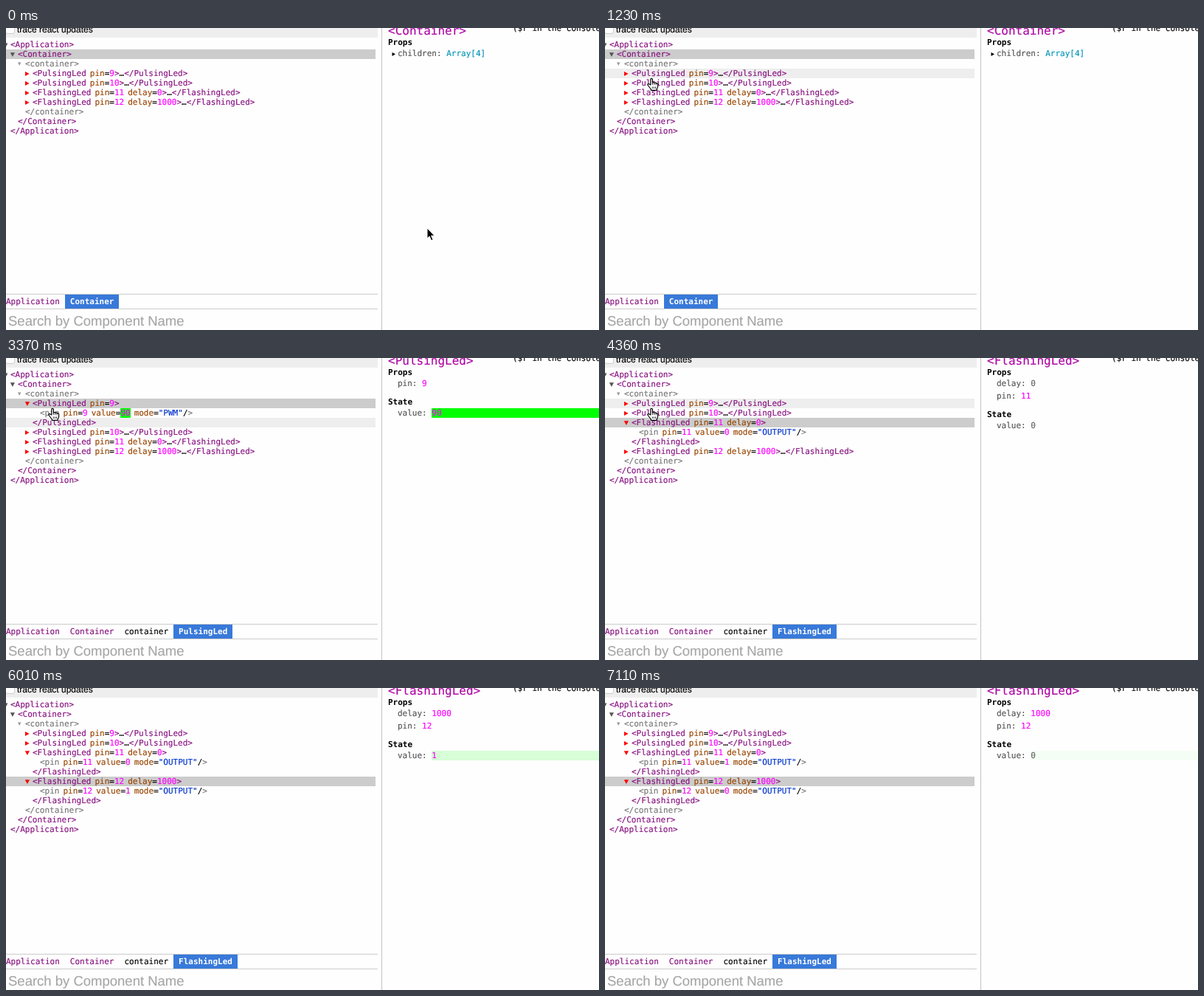
Animation, 804 px wide and 409 px high, one loop 7210 ms. Source, as an HTML page:

```html
<!DOCTYPE html>
<html lang="en">
<head>
<meta charset="utf-8">
<title>Component inspector</title>
<style>
html, body { margin: 0; width: 100%; height: 100%; overflow: hidden; background: #fff; }
#stage { position: relative; width: 804px; height: 409px; overflow: hidden; background: #fefefe;
  font: 11px/13px "DejaVu Sans Mono", Menlo, monospace; color: #000;
  text-rendering: geometricPrecision; -webkit-text-stroke: .15px; white-space: pre; }
#stage > div, #tree > div, #panel > div, svg { position: absolute; }
#tree, #panel { left: 0; top: 0; width: 804px; height: 409px; }
.sans { font-family: "Liberation Sans", Arial, sans-serif; }
#bar { left: 0; top: 0; width: 504px; height: 13px; background: #eee; }
#box { left: -1px; top: -6px; width: 11px; height: 12px; background: #fff; border: 1px solid #ccc; border-radius: 3px; }
#trace { left: 15px; top: -5px; font-size: 12px; line-height: 14px; }
#split { left: 509px; top: 0; width: 1px; height: 409px; background: #c4c4c4; }
#crumbs { left: 0; top: 360px; width: 504px; height: 19px; border: solid #ccc; border-width: 1px 0; line-height: 19px; overflow: hidden; }
#crumbs div { display: flex; margin-left: -7px; }
#crumbs span { padding: 0 7px; }
#crumbs span.on { background: #3879d9; color: #fff; font-weight: bold; -webkit-text-stroke: 0; }
#search { left: 3px; top: 386px; font-size: 18.5px; line-height: 22px; color: #a6a6a6; }
#tree > div { left: 0; width: 501px; height: 13px; box-sizing: border-box; }
.hover { background: #eee; }
.sel { background: #ccc; }
.c { color: #881280; }
.d { color: #777; }
.a { color: #994500; margin-left: 5px; }
.n { color: #f0f; }
.s { color: #0033cc; }
.k { color: #000; }
#hint { left: 687px; top: -6px; }
#title { left: 518px; top: -6px; font-size: 16px; line-height: 19px; color: #ae08a4; }
#panel .key { left: 531px; color: #555; }
#panel .val { right: 0; height: 13px; color: #666; }
#panel .val.n { color: #f0f; }
#panel .val.s { color: #0033cc; }
#panel .val.arr { color: #0095b8; }
#panel .head { left: 518px; font-weight: bold; -webkit-text-stroke: 0; }
</style>
</head>
<body>
<div id="stage">
  <div id="bar"></div>
  <div id="box"></div>
  <div id="trace" class="sans">trace react updates</div>
  <div id="tree"></div>
  <div id="crumbs"></div>
  <div id="search" class="sans">Search by Component Name</div>
  <div id="split"></div>
  <div id="hint">($r in the console)</div>
  <div id="title"></div>
  <div id="panel"></div>
  <svg id="arrow" width="14" height="20" viewBox="-1 -1 14 20">
    <path d="M0 0V14L3.2 11.2L5.6 16.8L8 15.8L5.6 10.4H10Z" fill="#000" stroke="#fff" stroke-width="1"/>
  </svg>
  <svg id="hand" width="17" height="19" viewBox="-7 -1 17 19">
    <path d="M-1.2 9V1.6Q-1.2 .4 0 .4T1.4 1.6V6Q2.6 5 3.8 6.3Q5.2 5.4 6.3 6.8Q8.6 6.3 8.6 8.4V11.5Q8.4 13 7.3 14.2V16.4H-.6V15L-3.8 11L-5.2 8.8Q-5 7.2-3.4 7.7Z" fill="#fff" stroke="#000" stroke-width="1.2" stroke-linejoin="round"/>
    <path d="M1.4 6V9M3.9 6.5V9.2M6.3 7V9.4M1.3 11.5V14M3.4 11.5V14M5.5 11.5V14" fill="none" stroke="#000" stroke-width=".8"/>
  </svg>
</div>
<script>
const LOOP = 7210, CHAR = 6.62, ROW = 13, TOP = 16;
const $ = id => document.getElementById(id);

// [start, node, closing tag selected]
const PICKS = [[0, 'Container'], [1530, 'p9'], [3950, 'p10'], [4180, 'f11'],
  [4480, 'pin11'], [4720, 'f11', true], [4880, 'f12']];
const OPEN = { p9: [2610, 3830], f11: [4360, LOOP], f12: [5180, LOOP] };
const FLIPS = [4600, 5480, 6240];
// [start, end, steps, from x, y, to x, y]
const MOVES = [[300, 520, 5, 571, 271, 67, 32], [1000, 1230, 5, 67, 32, 63, 67],
  [5480, 5900, 7, 63, 67, -16, 370]];

const LEDS = [
  { id: 'p9', name: 'PulsingLed', pin: 9 },
  { id: 'p10', name: 'PulsingLed', pin: 10 },
  { id: 'f11', name: 'FlashingLed', pin: 11, delay: 0 },
  { id: 'f12', name: 'FlashingLed', pin: 12, delay: 1000 }
];

const esc = s => String(s).replace(/</g, '&lt;').replace(/>/g, '&gt;');
const span = (cls, s) => `<span class="${cls}">${esc(s)}</span>`;
const attr = (key, val, style = '') =>
  span('a', key) + '=' + `<span class="${typeof val === 'string' ? 's' : 'n'}" style="${style}">` +
  (typeof val === 'string' ? `"${val}"` : val) + '</span>';
const green = alpha => alpha > 0.01 ? `background:rgba(0,255,0,${alpha.toFixed(3)})` : '';

function pulse(t) {
  const k = Math.floor((t - 3370) / 60);
  return 90 - (k > 0 ? k - 1 : k);
}

function ledValue(led, t) {
  if (led.delay === undefined) return pulse(t);
  const flips = FLIPS.filter(f => f <= t).length;
  return (flips + (led.delay ? 1 : 0)) % 2;
}

// Highlight left over from the last change made after `since`
function flash(led, t, since, decay) {
  if (led.delay === undefined) return t >= since + 60 ? 1 : 0;
  const last = FLIPS.filter(f => f <= t).pop();
  if (last === undefined || last < since) return 0;
  return Math.exp(-Math.floor((t - last) / 60) * 60 / decay);
}

function cursorAt(t) {
  let at = { x: 571, y: 271 };
  for (const [t0, t1, n, x0, y0, x1, y1] of MOVES) {
    if (t < t0) break;
    const p = Math.min(1, (Math.floor((t - t0) / ((t1 - t0) / (n - 1))) + 1) / n);
    const e = p * p * (3 - 2 * p);
    at = { x: x0 + (x1 - x0) * e, y: y0 + (y1 - y0) * e };
  }
  return at;
}

const isOpen = (id, t) => OPEN[id] && t >= OPEN[id][0] && t < OPEN[id][1];

function treeRows(t) {
  const rows = [];
  const add = (id, x, html, opt = {}) => rows.push({ id, x, html, ...opt });
  add('Application', 6, span('c', '<Application>'), { mark: 'down', fill: '#555', small: true });
  add('Container', 16, span('c', '<Container>'), { mark: 'down', fill: '#555' });
  add('container', 26, span('d', '<container>'), { mark: 'down', fill: '#999', small: true });
  for (const led of LEDS) {
    const open = isOpen(led.id, t);
    const head = span('c', '<' + led.name) + attr('pin', led.pin) +
      (led.delay === undefined ? '' : attr('delay', led.delay)) + span('c', '>');
    const tail = span('c', `</${led.name}>`);
    add(led.id, 36, open ? head : head + '…' + tail, { mark: open ? 'down' : 'right', fill: '#f00' });
    if (!open) continue;
    const glow = green(flash(led, t, OPEN[led.id][0] - 60, 190));
    add('pin' + led.pin, 46, span('d', '<pin') + attr('pin', led.pin) +
      attr('value', ledValue(led, t), glow) +
      attr('mode', led.delay === undefined ? 'PWM' : 'OUTPUT') + '/' + span('d', '>'));
    add(led.id, 36, tail, { tail: true });
  }
  add('container', 26, span('d', '</container>'), { tail: true });
  add('Container', 16, span('c', '</Container>'), { tail: true });
  add('Application', 6, span('c', '</Application>'), { tail: true });
  return rows;
}

function marker(row) {
  if (!row.mark) return '';
  const path = row.mark === 'right' ? 'M0 4L5.6 7L0 10Z'
    : row.small ? 'M0 4.5H4.4L2.2 9Z' : 'M-.2 4.2H6L2.9 10Z';
  const left = Math.max(row.x - 10, -2);
  return `<svg style="left:${left}px;top:0;overflow:visible" width="7" height="13"><path d="${path}" fill="${row.fill}"/></svg>`;
}

function drawTree(rows, pick, hoverId) {
  return rows.map((row, i) => {
    const selected = row.id === pick[1] && !!row.tail === !!pick[2];
    const cls = selected ? 'sel' : row.id === hoverId ? 'hover' : '';
    return `<div class="${cls}" style="top:${TOP + i * ROW}px;padding-left:${row.x}px">${marker(row)}${row.html}</div>`;
  }).join('');
}

function line(y, key, val, glow = '') {
  const kind = typeof val === 'string' ? 's' : val ? 'n' : '';
  const text = typeof val === 'string' ? `"${val}"` : val;
  return `<div class="key" style="top:${y}px">${key}:</div>` +
    `<div class="val ${kind}" style="top:${y}px;left:${531 + (key.length + 2) * CHAR}px;${glow}">${text}</div>`;
}
const heading = (y, s) => `<div class="head" style="top:${y}px">${s}</div>`;

function drawPanel(t, pick) {
  const id = pick[1];
  let html = heading(13, 'Props');
  if (id === 'Container') {
    return html + '<svg style="left:523px;top:28px" width="7" height="13"><path d="M.5 5L5 7.5L.5 10Z"/></svg>' +
      '<div class="key" style="top:28px">children:</div>' +
      `<div class="val arr" style="top:28px;left:${531 + 10 * CHAR}px">Array[4]</div>`;
  }
  const led = LEDS.find(l => l.id === id) || LEDS[2];
  const value = ledValue(led, t), glow = green(flash(led, t, pick[0], 255));
  if (id === 'pin11') {
    return html + line(28, 'mode', 'OUTPUT') + line(45, 'pin', 11) + line(62, 'value', value, glow);
  }
  let y = 28;
  if (led.delay !== undefined) {
    html += line(y, 'delay', led.delay);
    y += 17;
  }
  return html + line(y, 'pin', led.pin) + heading(y + 25, 'State') + line(y + 40, 'value', value, glow);
}

function crumbPath(id) {
  const path = ['Application', 'Container'];
  if (id === 'Container') return path;
  const led = LEDS.find(l => l.id === id);
  return path.concat('container', led ? led.name : ['FlashingLed', 'pin']);
}

function drawCrumbs(path) {
  return '<div>' + path.map((name, i) => {
    const cls = i === path.length - 1 ? 'on' : /^[A-Z]/.test(name) ? 'c' : 'k';
    return span(cls, name);
  }).join('') + '</div>';
}

const shown = {};
function put(id, html) {
  if (shown[id] === html) return;
  shown[id] = html;
  $(id).innerHTML = html;
}

function place(el, x, y, visible) {
  el.style.display = visible ? 'block' : 'none';
  el.style.left = x + 'px';
  el.style.top = y + 'px';
}

function render(t) {
  const pick = PICKS.filter(p => p[0] <= t).pop();
  const rows = treeRows(t);
  const cur = cursorAt(t);
  const row = rows[Math.floor((cur.y - TOP) / ROW)];
  const over = row && cur.x >= 0 && cur.x < 501;
  // The hovered node stays the same while the mouse rests
  const resting = t >= 1230 && t < 5480;
  const hoverId = resting ? 'p9' : over ? row.id : '';
  const hand = resting || over;
  const path = crumbPath(pick[1]);

  put('tree', drawTree(rows, pick, hoverId));
  put('panel', drawPanel(t, pick));
  put('title', esc(`<${path[path.length - 1]}>`));
  put('crumbs', drawCrumbs(path));
  const x = Math.round(cur.x), y = Math.round(cur.y);
  place($('arrow'), x - 1, y - 1, !hand);
  place($('hand'), x - 7, y, hand);
}

function tick() {
  render(performance.now() % LOOP);
  requestAnimationFrame(tick);
}
tick();
</script>
</body>
</html>
```
